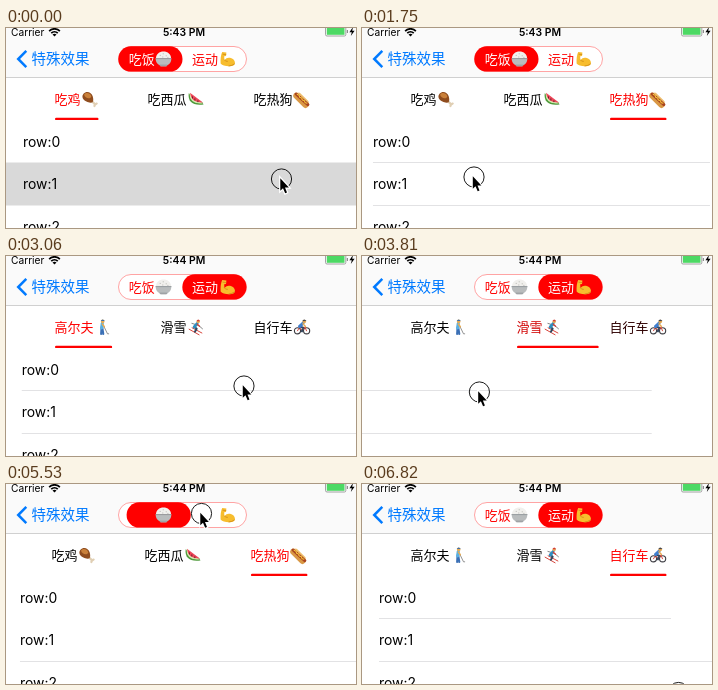
Recreate the animation shown at these times as an HTML page with a canvas. Size 350 by 200 pixels, loop 6.92 s.

```html
<!DOCTYPE html>
<html lang="zh">
<head>
<meta charset="utf-8">
<title>Nested pager</title>
<style>
html, body { margin: 0; width: 100%; height: 100%; overflow: hidden; background: #fff; }
canvas { display: block; width: 350px; height: 200px; }
</style>
</head>
<body>
<canvas id="stage"></canvas>
<script>
const LOOP = 6920, PAGE = 354, RED = '#ff0000', BLUE = '#007aff';
const CJK = '"Noto Sans CJK SC", "Noto Sans CJK JP", "Noto Sans CJK", sans-serif';
const LATIN = 'Inter, Roboto, sans-serif';
const canvas = document.getElementById('stage');
const c = canvas.getContext('2d');
const dpr = window.devicePixelRatio || 1;
canvas.width = 350 * dpr;
canvas.height = 200 * dpr;

// Icons on a 17 x 17 grid: colour, path, optional stroke width.
const ICONS = {
  chicken: [
    ['#e0cfb4', 'M9 9L13.6 13.6M13.6 13.6L15.2 12.8M13.6 13.6L12.9 15.2', 2.2],
    ['#8f4c1e', 'M2 3C5 -.5 10 1.4 11.2 5.5C12 8.6 12 10.6 11 11.4C10 12.2 8 11.8 6 11.2C1.6 9.8 -.5 6 2 3Z'],
    ['#c9803a', 'M2.6 3.6C5 1 8.6 2.4 9.8 5.4C9.4 8.6 3.4 8 2.6 3.6Z']
  ],
  melon: [
    ['#4f9a3c', 'M1.2 2.5Q-.2 15.5 16 13.6L15 11.8Z'],
    ['#d9edb4', 'M2 2.3Q2 14 15.4 12.4Z'],
    ['#f0465a', 'M2.5 2Q3.5 12.4 15.4 11.6Z'],
    ['#5b2024', 'M5 6v1.3M7.4 8v1.3M10.4 10v1', .9]
  ],
  hotdog: [
    ['#d99845', 'M3 5L12 14', 6.4],
    ['#edbd6c', 'M5.4 3.4L13.6 11.4', 3.4],
    ['#a8431f', 'M2.6 3.2L14.4 13.8', 3],
    ['#ffd43b', 'M3.6 3.6L5.8 4.6L6 6.6L8.4 7.2L8.6 9.2L11 9.8L11.4 11.8L13.4 12.4', 1]
  ],
  rice: [
    ['#f1f0ed', 'M1 8C.6 3.5 4.5 .8 8.5 .8S16.4 3.5 16 8Z'],
    ['#bdbcb8', 'M5 4.6h.6M8 3h.6M11 5h.6M7.4 6.2h.6M12.6 6.6h.6', .8],
    ['#b9bcbd', 'M.6 7.4H16.4Q16.2 12.8 12.2 14.4L11.4 15.8H5.6L4.8 14.4Q.8 12.8 .6 7.4Z'],
    ['#8b9093', 'M1 7.8H16M5 14.4H12', .8]
  ],
  arm: [
    ['#f7bd2e', 'M3.2 1.2L7.4 1.8L7 5.2L5.2 5.4L5.4 9.2Q8 6.2 11 7Q15.6 8 16 12.2Q15.6 15.6 10 15.4Q4 15.4 1.6 12.8Q1.2 5.4 3.2 1.2Z'],
    ['#cf8a18', 'M5.4 9.2Q6.2 10.8 8.4 10.6M4 3.4L6.8 3.8M10 15.2Q13 15 15.4 13.2', .8]
  ],
  golf: [
    ['#777777', 'M9.6 8L13 15H14.2', .8],
    ['#3a6fb5', 'M7 8.5L6.6 15.2M7.8 8.5L8.8 15.2', 2],
    ['#58b0e4', 'M7.8 4.8L7.2 9', 3.2],
    ['#e7ab52', 'M7.8 5.2L9.8 8', 1.5],
    ['#e7ab52', 'M6.4 2.6A1.8 1.8 0 1 0 10 2.6A1.8 1.8 0 1 0 6.4 2.6Z'],
    ['#3f6fa8', 'M6.2 2.2Q8 -1 10.4 2.2Z']
  ],
  ski: [
    ['#d8453c', 'M1.6 10.4L11.6 16M4.6 9L14.4 14.2', 1],
    ['#666666', 'M10.4 6.4L4.4 4.6M12 7.4L15 10', .8],
    ['#32475f', 'M6.8 8L9.2 10L7.4 13', 1.9],
    ['#2f8fc0', 'M9.6 4.8L6.8 8.2', 3],
    ['#d23d37', 'M9.8 5.4L12 7.4', 1.3],
    ['#e7ab52', 'M9 2.8A1.7 1.7 0 1 0 12.4 2.8A1.7 1.7 0 1 0 9 2.8Z'],
    ['#d23d37', 'M8.8 2.4Q10.8 -.8 12.6 2.4Z']
  ],
  bike: [
    ['#3c3c42', 'M.9 12A3.1 3.1 0 1 0 7.1 12A3.1 3.1 0 1 0 .9 12ZM10 12A3.1 3.1 0 1 0 16.2 12A3.1 3.1 0 1 0 10 12Z', 1.1],
    ['#d2483f', 'M4 12L6 8.6H11.6L13 12M6 8.6L8.6 12L11.6 8.6', 1],
    ['#32475f', 'M6 7.6L9.6 9L8.4 12.6', 2],
    ['#3f7fd0', 'M9.4 4.6L6.2 7.6', 3.2],
    ['#e7ab52', 'M9.4 5L12 7.6', 1.4],
    ['#e7ab52', 'M9 2.8A1.8 1.8 0 1 0 12.6 2.8A1.8 1.8 0 1 0 9 2.8Z'],
    ['#46464c', 'M8.6 2.4Q10.6 -1 13 2.2Z']
  ]
};

// Each tab: label, icon, left edge, width.
const TABS = [
  [['吃鸡', 'chicken', 49, 43.5], ['吃西瓜', 'melon', 142, 57], ['吃热狗', 'hotdog', 248, 56.5]],
  [['高尔夫', 'golf', 49, 56.5], ['滑雪', 'ski', 155, 43], ['自行车', 'bike', 248, 56.5]]
];

// Finger drag, fling past the page edge, settle: time, distance.
const SWIPE = [[0, 0], [50, 63], [120, 160], [200, 270], [280, 346], [340, 367], [400, 370], [480, 361], [560, PAGE]];

// Time, x, y of the pointer ring.
const POINTER = [
  [0, 275.5, 151], [260, 275.5, 151], [490, 288, 149], [640, 288, 149],
  [790, 130.5, 148], [1040, 130.5, 148], [1320, 300, 150], [1440, 300, 150],
  [1580, 112, 149], [1830, 112, 149], [2110, 269, 149], [2260, 269, 149],
  [2400, 81.5, 149], [2440, 64, 149], [2560, 64, 149], [2830, 225.5, 134], [2850, 225.5, 134],
  [2910, 238, 130], [3060, 238, 130], [3200, 72, 134], [3400, 72, 134],
  [3670, 181, 136], [3760, 181, 136], [3810, 118.5, 136], [3880, 50, 138],
  [4080, 50, 138], [4430, 134, 44], [4460, 134, 44], [4520, 137.5, 30],
  [4920, 137.5, 30], [5320, 195.5, 29.5], [5990, 195.5, 29.5],
  [6330, 275, 115], [6670, 316.5, 208.5]
];

const clamp = (v, a = 0, b = 1) => Math.min(b, Math.max(a, v));
const lerp = (a, b, f) => a + (b - a) * f;

// Smooth monotone interpolation through key points.
function track(keys, t, k = 1) {
  const last = keys.length - 1;
  if (t <= keys[0][0]) return keys[0][k];
  if (t >= keys[last][0]) return keys[last][k];
  const i = keys.findIndex(p => p[0] > t) - 1;
  const slope = j => (keys[j + 1][k] - keys[j][k]) / (keys[j + 1][0] - keys[j][0]);
  const tangent = j => {
    if (j < 1 || j >= last) return 0;
    const a = slope(j - 1), b = slope(j);
    return a * b <= 0 ? 0 : 2 * a * b / (a + b);
  };
  const h = keys[i + 1][0] - keys[i][0], u = (t - keys[i][0]) / h;
  // A drag starts at full speed.
  const m0 = (i === 0 && keys === SWIPE ? slope(0) : tangent(i)) * h;
  const m1 = tangent(i + 1) * h, a = keys[i][k], b = keys[i + 1][k];
  return a + u * (m0 + u * (3 * (b - a) - 2 * m0 - m1 + u * (2 * (a - b) + m0 + m1)));
}

function bezier(x, x1, y1, x2, y2) {
  x = clamp(x);
  const at = (p, q, u) => 3 * p * u * (1 - u) ** 2 + 3 * q * u * u * (1 - u) + u ** 3;
  let lo = 0, hi = 1;
  for (let i = 0; i < 24; i++) {
    const mid = (lo + hi) / 2;
    if (at(x1, x2, mid) < x) lo = mid; else hi = mid;
  }
  return at(y1, y2, lo);
}

const swipe = (t, start) => track(SWIPE, t - start);
const glide = (t, start) => bezier((t - start) / 300, .42, 0, .58, 1);
const snap = (t, start) => bezier((t - start) / 250, 0, 0, .58, 1);
const TAP1 = 4676, TAP2 = 5511;

function state(t) {
  const drag = swipe(t, 2260) / PAGE;
  const outer = drag - glide(t, TAP1) + glide(t, TAP2);
  const pill = clamp(drag) - snap(t, TAP1) + snap(t, TAP2);
  const sport = t >= TAP2 || (t < TAP1 && drag > .5);
  const inner = [
    (swipe(t, 640) + swipe(t, 1440)) / PAGE,
    (swipe(t, 3060) + swipe(t, 3760)) / PAGE
  ];
  return { outer, pill, sport, inner };
}

function text(str, x, y, size, color, font = CJK, weight = 400, align = 'left') {
  c.font = `${weight} ${size}px ${font}`;
  c.fillStyle = color;
  c.textAlign = align;
  c.fillText(str, x, y);
}

function rect(x, y, w, h, color) {
  c.fillStyle = color;
  c.fillRect(x, y, w, h);
}

function capsule(x, y, w, h) {
  const r = Math.min(w, h) / 2;
  c.beginPath();
  c.arc(x + r, y + r, r, Math.PI / 2, Math.PI * 1.5);
  c.arc(x + w - r, y + r, r, -Math.PI / 2, Math.PI / 2);
  c.closePath();
}

function shape(d, color, width) {
  const p = new Path2D(d);
  if (width) {
    c.strokeStyle = color;
    c.lineWidth = width;
    c.stroke(p);
  } else {
    c.fillStyle = color;
    c.fill(p);
  }
}

function icon(name, x, y) {
  c.save();
  c.translate(x, y);
  c.lineCap = c.lineJoin = 'round';
  for (const [color, d, width] of ICONS[name]) shape(d, color, width);
  c.restore();
}

function tabs(items, pos) {
  items.forEach(([label, name, x], i) => {
    const red = Math.round(255 * clamp(1 - Math.abs(pos - i)));
    text(label, x - .4, 75.6, 13, `rgb(${red},0,0)`);
    icon(name, x + label.length * 13 + .5, 62.8);
  });
  // The leading end of the underline moves first, the trailing end follows.
  const p = clamp(pos, 0, 2), i = Math.min(1, Math.floor(p)), f = p - i;
  const [, , ax, aw] = items[i], [, , bx, bw] = items[i + 1];
  const left = lerp(ax, bx, clamp(2 * f - 1));
  const right = lerp(ax + aw, bx + bw, clamp(2 * f));
  capsule(left, 89.7, right - left, 2.4);
  c.fillStyle = RED;
  c.fill();
}

function list(x, t, moving) {
  const pressed = t < 650;
  if (pressed) rect(x, 134.5, PAGE, 43, '#d9d9d9');
  for (let r = 0; r < 3; r++) text('row:' + r, x + 17, 118.8 + r * 42.5, 13.9, '#000', LATIN);
  if (pressed) return;
  const line = '#e2e2e4';
  if (!moving) rect(x + 17, 134, t > 5800 ? 292 : PAGE - 17, 1, line);
  rect(x + 17, 177, PAGE - 17, 1, line);
}

function pages(t, s) {
  const moving = Math.abs(s.outer - Math.round(s.outer)) > .002;
  for (let p = 0; p < 2; p++) {
    const x = (p - s.outer) * PAGE;
    if (x <= -PAGE || x >= 350) continue;
    c.save();
    c.beginPath();
    c.rect(x, 50, PAGE, 150);
    c.clip();
    c.translate(x, 0);
    tabs(TABS[p], s.inner[p]);
    // A list is only loaded once its page is the nearest one.
    for (let i = 0; i <= Math.min(2, Math.round(s.inner[p])); i++) {
      const left = (i - s.inner[p]) * PAGE;
      if (Math.abs(left) < PAGE) list(left, t, moving);
    }
    c.restore();
  }
}

function statusBar(t) {
  text('Carrier', 5, 7.8, 10.2, '#000', LATIN);
  text(t < 2600 ? '5:43 PM' : '5:44 PM', 178, 7.8, 10.4, '#000', LATIN, 600, 'center');
  for (const r of [8.4, 5.4]) {
    c.beginPath();
    c.arc(48.5, 8.4, r - .8, -Math.PI * .75, -Math.PI * .25);
    c.strokeStyle = '#000';
    c.lineWidth = 1.7;
    c.stroke();
  }
  shape('M48.5 8.6L46.5 6.5Q48.5 4.8 50.5 6.5Z', '#000');
  shape('M320.5 -1.5H338.5Q339.8 -1.5 339.8 0V6.5Q339.8 8 338.5 8H321Q319.5 8 319.5 6.5V0Q319.5 -1.5 321 -1.5Z', '#8c8c8c', .8);
  rect(320.8, -1, 17.7, 7.8, '#4cd964');
  rect(340.8, 2, 1.2, 3, '#8c8c8c');
  shape('M347 -1L343.4 4.2H345.8L344.8 8L348.6 2.8H346.2Z', '#000');
}

function navBar(t, s) {
  rect(0, 0, 350, 49, '#fafafa');
  rect(0, 49, 350, 1, '#d0d0d0');
  statusBar(t);
  shape('M20.3 22.8L12.2 31L20.3 39.2', BLUE, 2.5);
  text('特殊效果', 25.5, 36.2, 14.5, BLUE);

  capsule(112.5, 18.5, 128, 25);
  c.fillStyle = '#fff';
  c.fill();
  c.strokeStyle = '#ff9a9a';
  c.lineWidth = .9;
  c.stroke();
  capsule(112.3 + 64 * s.pill, 18.2, 64.2, 25.4);
  c.fillStyle = RED;
  c.fill();
  text('吃饭', 122.7, 35.6, 13, s.sport ? RED : '#fff');
  icon('rice', 149, 22.8);
  text('运动', 186, 35.6, 13, s.sport ? '#fff' : RED);
  icon('arm', 213, 22.8);
}

function pointer(t) {
  c.save();
  c.translate(track(POINTER, t, 1), track(POINTER, t, 2));
  c.beginPath();
  c.arc(0, 0, 10.1, 0, Math.PI * 2);
  c.strokeStyle = '#000';
  c.lineWidth = .9;
  c.stroke();
  const arrow = 'M-1.2 -.8V11.8L1.5 9.3L3.7 14.3L5.5 13.5L3.5 8.6H7.4Z';
  shape(arrow, '#fff', 2.4);
  shape(arrow, '#000');
  c.restore();
}

function draw(now) {
  const t = now % LOOP, s = state(t);
  c.setTransform(dpr, 0, 0, dpr, 0, 0);
  rect(0, 0, 350, 200, '#fff');
  pages(t, s);
  navBar(t, s);
  pointer(t);
}

const start = performance.now();
function tick() {
  draw(performance.now() - start);
  requestAnimationFrame(tick);
}
tick();
</script>
</body>
</html>
```
